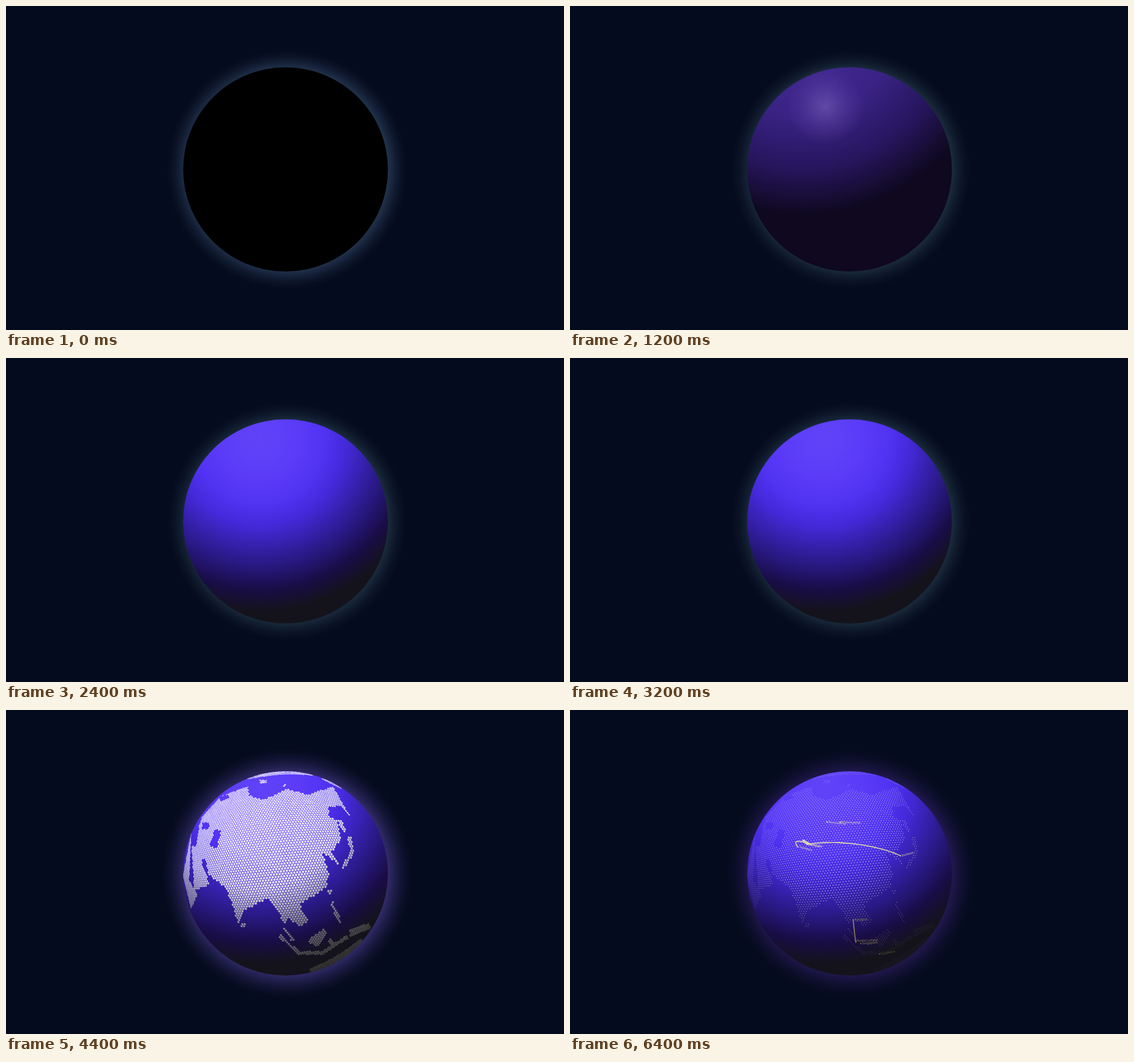
An HTML page with a canvas that plays this animation: 981x571 px, repeating every 6.8 s.

```html
<!DOCTYPE html>
<html lang="en">
<head>
<meta charset="utf-8">
<title>Globe</title>
<style>
  html, body { margin: 0; width: 100%; height: 100%; overflow: hidden; background: #050b1e; }
  canvas { display: block; }
</style>
</head>
<body>
<canvas id="stage" width="981" height="571"></canvas>
<script>
const ctx = document.getElementById('stage').getContext('2d');
const STEP = 400, LOOP = 6800, TAU = Math.PI * 2;
const CX = 491.5, CY = 288, RADIUS = 180;

// Camera above 33°N 99°E, three globe radii from the centre
const DISTANCE = 3, FOCAL = RADIUS * Math.sqrt(DISTANCE ** 2 - 1);
const rad = degrees => degrees * Math.PI / 180;
const VIEW_LAT = rad(33), VIEW_LON = rad(99);

function onGlobe(lat, lon) {
  const a = rad(lat), b = rad(lon) - VIEW_LON;
  const up = Math.sin(a), out = Math.cos(a) * Math.cos(b);
  const s = Math.sin(VIEW_LAT), c = Math.cos(VIEW_LAT);
  return [Math.cos(a) * Math.sin(b), up * c - out * s, up * s + out * c];
}

function project([x, y, z]) {
  const scale = FOCAL / (DISTANCE - z);
  return [CX + x * scale, CY - y * scale];
}

// Colours are spread evenly from the centre to the rim
function radial(x, y, r, colors) {
  const gradient = ctx.createRadialGradient(x, y, 0, x, y, r);
  colors.forEach((color, i) => gradient.addColorStop(i / (colors.length - 1), color));
  return gradient;
}

function glow(rgb, reach) {
  const gradient = ctx.createRadialGradient(494, CY, 176, 494, CY, reach);
  for (let t = 0; t <= 1; t += 0.125) gradient.addColorStop(t, `rgba(${rgb},${(1 - t) ** 1.6})`);
  return gradient;
}

function disc(x, y, r, fill) {
  ctx.beginPath();
  ctx.arc(x, y, r, 0, TAU);
  ctx.fillStyle = fill;
  ctx.fill();
}

// Rough coastlines on the stage; islands and seas are thick strokes
const land = new Path2D(`M326 242L345 188 378 152 425 135 428 151 455 158 492 139 530 149 575 135
  604 186 587 168 568 172 568 190 581 193 590 228 571 252 584 271 556 252 569 292 561 315 516 342
  531 372 519 383 494 366 490 376 464 334 446 337 420 354 409 377 388 316 350 284 358 308 331 318Z
  M311 292L326 214 322 300 337 325 325 351Z M528 408L560 384 565 393 550 418Z`);
const islands = [
  ['M585 194L597 214M603 222L609 252 592 278M569 316V324M572 340L588 376M417 375V384', 6],
  ['M482 398L514 428H556L600 400M488 384L505 406M568 402L574 414', 6],
  ['M425 119Q490 106 540 113M556 119L590 136M446 126H458M488 133H492', 6],
  ['M604 394L640 380', 11],
  ['M536 463Q590 442 628 408', 15]
].map(thick);
const seas = [
  ['M373 211L364 242M351 198V210', 12],
  ['M336 208L331 240M347 264L352 286M376 157L391 152', 7]
].map(thick);

function thick([d, width]) {
  return { path: new Path2D(d), width };
}

function touches({ path, width }, x, y) {
  ctx.lineWidth = width;
  return ctx.isPointInStroke(path, x, y);
}

function isLand(x, y) {
  if (islands.some(island => touches(island, x, y))) return true;
  return ctx.isPointInPath(land, x, y) && !seas.some(sea => touches(sea, x, y));
}

// Equal-area honeycomb over the visible side of the globe
function dotPath(size) {
  const path = new Path2D(), gap = 0.0203, turn = -0.1, span = 72;
  for (let row = -span; row <= span; row++) {
    for (let col = -span; col <= span; col++) {
      const u = (col + (row & 1) / 2) * gap, v = row * gap * Math.sqrt(3) / 2;
      const theta = 2 * Math.asin(Math.min(1, Math.hypot(u, v) / 2));
      const cos = Math.cos(theta), depth = DISTANCE - cos;
      if (cos <= 1 / DISTANCE) continue;
      const angle = Math.atan2(v, u) + turn, reach = FOCAL * Math.sin(theta) / depth;
      const x = CX + reach * Math.cos(angle), y = CY + reach * Math.sin(angle);
      if (!isLand(x, y)) continue;
      const across = FOCAL / depth * gap * size;
      const along = across * (DISTANCE * cos - 1) / depth;
      const dot = new Path2D();
      dot.ellipse(x, y, along, across, angle, 0, TAU);
      path.addPath(dot);
    }
  }
  return path;
}

const bigDots = dotPath(0.44), smallDots = dotPath(0.17);

const bigInk = radial(440, 150, 330, ['#f1edff', '#efebfd', '#e4e0f2', '#77757f', '#38372f']);
const smallInk = radial(440, 150, 330, ['#b9a9ff', '#c8bfff', '#b6aef2', '#5d567f', '#29272b']);
const labelInk = radial(440, 150, 330, ['#efeab8', '#e8e4ae', '#d4d090', '#88844c', '#4b4530']);
const blue = radial(445, 143, 304, ['#6042f8', '#5e40f8', '#5a3af7', '#5133f3', '#4429da',
  '#3520ab', '#26177a', '#190d45', '#14131c']);
const purple = radial(410, 30, 340, ['#46299a', '#40268f', '#372081', '#25145c', '#0c0519']);
const spot = radial(449, 177, 68, ['rgba(145,125,205,.45)', 'rgba(130,105,200,.22)', 'rgba(120,90,200,0)']);
const halos = {
  steel: glow('36,54,80', 213),
  teal: glow('28,46,63', 212),
  violet: glow('52,45,110', 222),
  indigo: glow('35,25,82', 220)
};

const cities = {
  Incheon: [37.5, 126.4],
  Bangkok: [13.7, 100.5],
  'Kuala Lumpur': [3.1, 101.7],
  Singapore: [1.4, 103.8],
  Surabaya: [-7.2, 112.7],
  Novosibirsk: [54, 83],
  Krasnoyarsk: [54.5, 92.5],
  Tashkent: [41, 69.2],
  Bishkek: [42.9, 74.6],
  Almaty: [43.2, 76.9]
};
const network = [
  ['Tashkent', 'Incheon'], ['Bishkek', 'Krasnoyarsk'], ['Krasnoyarsk', 'Bangkok'],
  ['Bangkok', 'Kuala Lumpur'], ['Almaty', 'Bangkok'], ['Bangkok', 'Incheon'],
  ['Incheon', 'Kuala Lumpur'], ['Kuala Lumpur', 'Surabaya']
];
const routes = [
  ['Bishkek', 'Incheon'], ['Bangkok', 'Kuala Lumpur'], ['Bishkek', 'Almaty'], ['Tashkent', 'Almaty']
];

// Great circle between two cities, lifted off the ground halfway
function drawRoute([from, to], color, width) {
  const a = onGlobe(...cities[from]), b = onGlobe(...cities[to]);
  ctx.beginPath();
  for (let t = 0; t <= 1; t += 1 / 32) {
    const point = a.map((value, i) => value * (1 - t) + b[i] * t);
    const lift = (1 + 0.1 * Math.sin(Math.PI * t)) / Math.hypot(...point);
    ctx.lineTo(...project(point.map(value => value * lift)));
  }
  ctx.strokeStyle = color;
  ctx.lineWidth = width;
  ctx.stroke();
}

// Names follow their parallel
function drawCity([name, [lat, lon]]) {
  const [x, y] = project(onGlobe(lat, lon)), [x2, y2] = project(onGlobe(lat, lon + 1));
  disc(x, y, 1.2, labelInk);
  const text = ctx.fillStyle;
  ctx.save();
  ctx.translate(x + 2.5, y);
  ctx.rotate(Math.atan2(y2 - y, x2 - x));
  ctx.font = '5.6px Inter, sans-serif';
  ctx.textBaseline = 'middle';
  ctx.fillStyle = y > 420 ? '#57502e' : y > 340 ? '#88844c' : '#e2dda6';
  ctx.fillText(name, 0, 0);
  ctx.restore();
}

function drawScene(time) {
  const big = time >= 4000 && time < 4800;
  const halo = time < 400 ? 'steel' : time < 4000 ? 'teal' : big ? 'violet' : 'indigo';
  ctx.fillStyle = '#050b1e';
  ctx.fillRect(0, 0, 981, 571);
  disc(494, CY, 230, halos[halo]);
  disc(CX, CY, RADIUS, time < 400 ? '#000' : time < 2400 ? purple : blue);

  if (time >= 400 && time < 2400) {
    disc(449, 177, 68, spot);
    if (time >= 1200) disc(CX, CY, RADIUS, 'rgba(90,80,160,.04)');
  }
  if (time >= 4000) {
    ctx.fillStyle = big ? bigInk : smallInk;
    ctx.fill(big ? bigDots : smallDots);
  }
  if (time >= 5200 && time < 6400) {
    network.forEach(route => drawRoute(route, 'rgba(211,199,246,.68)', 1.1));
  }
  if (time >= 6400) {
    routes.forEach(route => drawRoute(route, labelInk, 1.7));
    Object.entries(cities).forEach(drawCity);
  }
}

let shown = -1;
function tick(now) {
  const time = Math.floor((now % LOOP) / STEP) * STEP;
  if (time !== shown) drawScene(shown = time);
  requestAnimationFrame(tick);
}
tick(performance.now());
</script>
</body>
</html>
```
